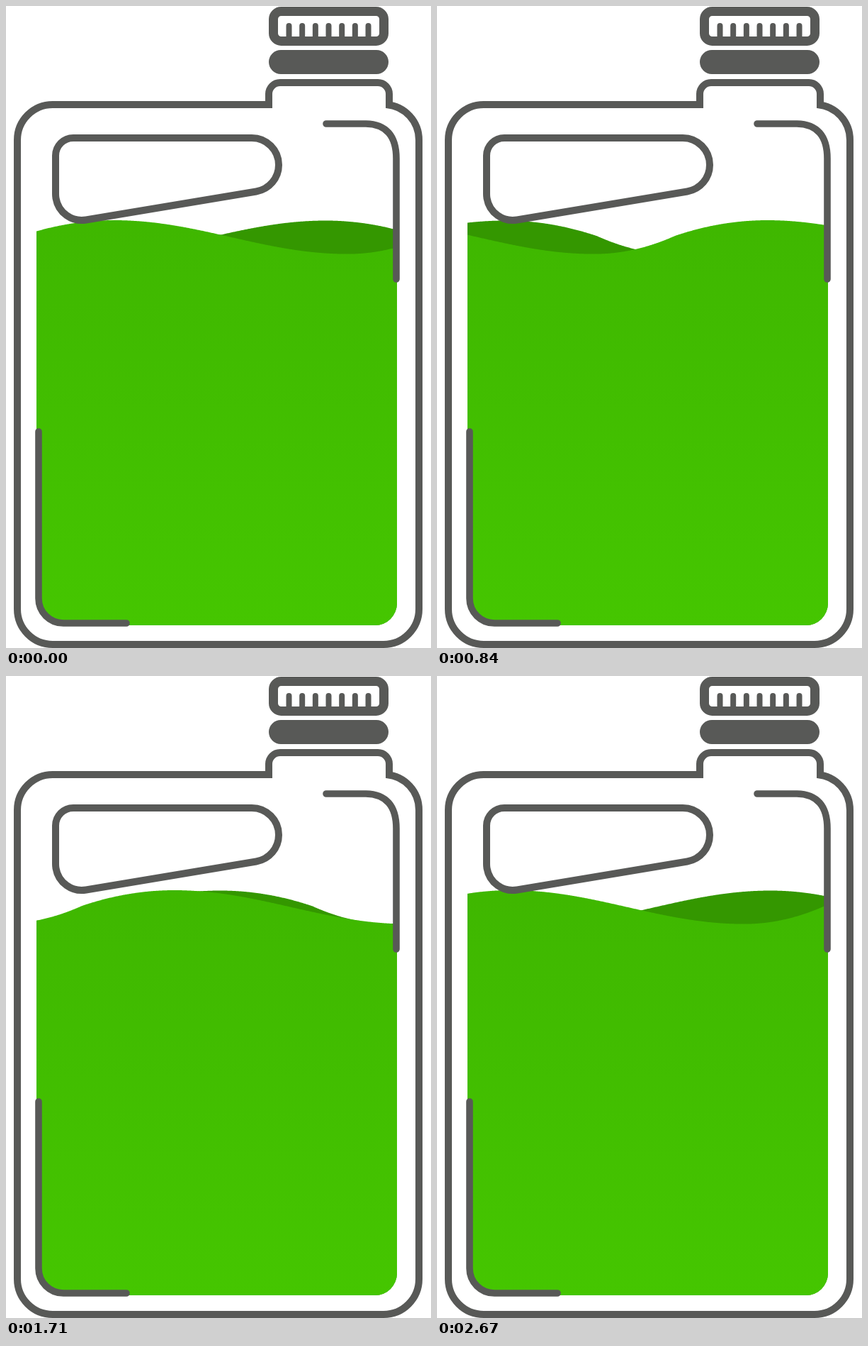
Animation of 600x905 px, one loop 2700 ms. Source, as an HTML page with a canvas:

```html
<!DOCTYPE html>
<html lang="en">
<head>
<meta charset="utf-8">
<title>Canister</title>
<style>
html, body { margin: 0; width: 100%; height: 100%; overflow: hidden; background: #fff; }
canvas { display: block; }
</style>
</head>
<body>
<canvas id="stage" width="600" height="905"></canvas>
<script>
const ctx = document.getElementById('stage').getContext('2d');
const GREY = '#585957';
const STEP_MS = 30, STEPS = 90;
const PERIOD = 574, CREST = 130, TROUGH = 460;
const TOP = 302, KINK = 324, BOTTOM = 349.6;
const LEFT = 43, RIGHT = 552, BASE = 873;

const green = ctx.createLinearGradient(0, TOP, 0, BASE);
green.addColorStop(0, '#3fb700');
green.addColorStop(1, '#45c600');

// Height of one wave: a dome from the kink, a smooth slope, then a bowl back up.
function waveY(u) {
  u = ((u % PERIOD) + PERIOD) % PERIOD;
  if (u < CREST) return TOP + (KINK - TOP) * ((CREST - u) / CREST) ** 2;
  if (u < TROUGH) {
    const k = (u - CREST) / (TROUGH - CREST);
    return TOP + (BOTTOM - TOP) * (1 - Math.cos(Math.PI * k)) / 2;
  }
  return BOTTOM - (BOTTOM - KINK) * ((u - TROUGH) / (PERIOD - TROUGH)) ** 2;
}

function liquid(fill, heightAt) {
  ctx.beginPath();
  ctx.moveTo(LEFT, BASE);
  for (let x = LEFT; x <= RIGHT; x++) ctx.lineTo(x, heightAt(x));
  ctx.arcTo(RIGHT, BASE, RIGHT - 31, BASE, 31);
  ctx.arcTo(LEFT, BASE, LEFT, BASE - 38, 38);
  ctx.closePath();
  ctx.fillStyle = fill;
  ctx.fill();
}

function stroke(path, width = 10, cap = 'butt') {
  ctx.lineWidth = width;
  ctx.lineCap = cap;
  ctx.strokeStyle = GREY;
  ctx.stroke(path);
}

const shell = new Path2D('M371 139H66A50 50 0 0 0 16 189V850A50 50 0 0 0 66 900H533A50 50 0 0 0 583 850V189A50 50 0 0 0 537 139');
const neck = new Path2D('M371 144V124A16 16 0 0 1 387 108H525A16 16 0 0 1 541 124V144');
const shine = new Path2D('M452 166H508Q551 167 551 215V385M46 600V835A35 35 0 0 0 81 870H170');

const handle = new Path2D();
handle.arc(347, 224, 38, -Math.PI / 2, 1.405);
handle.arc(107, 265, 37, 1.405, Math.PI);
handle.arcTo(70, 186, 95, 186, 25);
handle.closePath();

const cap = new Path2D();
cap.roundRect(377.5, 7.5, 156, 42, 11);
const band = new Path2D();
band.roundRect(371, 62, 169, 34, 17);
const ticks = new Path2D();
for (let i = 0; i < 7; i++) {
  const x = 399.5 + i * 18.67;
  ticks.moveTo(x, 28);
  ticks.lineTo(x, 46);
}

function draw(step) {
  ctx.clearRect(0, 0, 600, 905);
  const frontKink = 22.4 + 31.7 * step;
  const backKink = 581.5 - 12.68 * step;
  liquid('#349700', x => waveY(backKink - x) + 0.5);
  liquid(green, x => waveY(x - frontKink));

  stroke(shell);
  stroke(neck);
  stroke(handle);
  stroke(shine, 9.6, 'round');
  stroke(cap, 13);
  stroke(ticks, 8, 'round');
  ctx.fillStyle = GREY;
  ctx.fill(band);
}

function tick() {
  draw(Math.floor(performance.now() / STEP_MS) % STEPS);
  requestAnimationFrame(tick);
}
tick();
</script>
</body>
</html>
```
